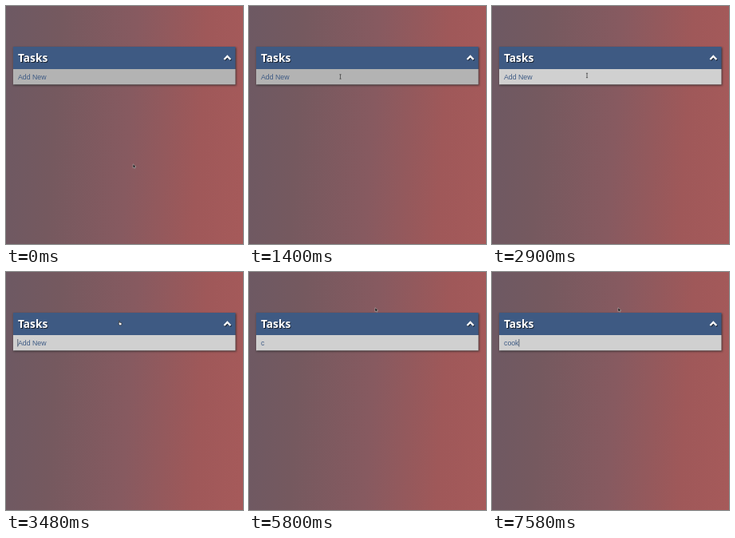
An HTML page that plays this animation: 297x298 px, repeating every 8 s.

```html
<!DOCTYPE html>
<html lang="en">
<head>
<meta charset="utf-8">
<title>Tasks</title>
<style>
  html, body { margin: 0; width: 100%; height: 100%; overflow: hidden; }
  body { background: linear-gradient(94deg, #6d5963 0%, #75595f 22%, #875a60 52%, #9f5859 80%, #a65a5a 100%); }
  svg { display: block; position: absolute; left: 0; top: 0; }
  .title { font: 700 13.7px "Open Sans", "Noto Sans", sans-serif; }
  .entry { font: 8.75px "Liberation Sans", Arial, sans-serif; fill: #3d5a84; }
  .chevron { fill: none; stroke-width: 2.3; }
</style>
</head>
<body>
<svg width="297" height="298" viewBox="0 0 297 298">
  <defs>
    <filter id="soft" x="-5%" y="-20%" width="110%" height="140%">
      <feGaussianBlur stdDeviation="0.8"/>
    </filter>
  </defs>

  <rect x="9.5" y="52" width="279" height="47.5" fill="#222" opacity=".75" filter="url(#soft)"/>
  <rect x="9" y="51" width="278.5" height="28" fill="#3e5a83"/>
  <rect id="row" x="9" y="79" width="278.5" height="19.3"/>

  <text class="title" x="15.9" y="71" fill="#17202e">Tasks</text>
  <text class="title" x="15" y="70" fill="#fff">Tasks</text>
  <path class="chevron" d="M274.2 68 L278.2 64 L282.2 68" stroke="#17202e"/>
  <path class="chevron" d="M273.4 67 L277.4 63 L281.4 67" stroke="#fff"/>

  <text id="entry" class="entry" x="15" y="91.6"></text>
  <rect id="caret" y="84" width=".8" height="9.6" fill="#3a4a60"/>

  <g id="pointer">
    <path id="arrow" d="M-1.8 -2.6 L2 .9 L.3 1.1 L1 2.6 L.1 2.9 L-.6 1.4 L-1.8 2.3 Z"
          fill="#111" stroke="#ccc" stroke-width=".5"/>
    <path id="beam" d="M-1.1 -2.7 H1.1 M0 -2.7 V2.7 M-1.1 2.7 H1.1"
          fill="none" stroke="#444" stroke-width=".8"/>
    <path id="hand" d="M-1.6 -2.8 L-.6 -2.8 L-.4 -.8 L2 -.2 L1.9 1.5 L1.2 2.8 L-.8 2.8 L-2.2 .6 L-1.4 .2 Z"
          fill="#f4f4f4" stroke="#1a1a1a" stroke-width=".6"/>
  </g>
</svg>

<script>
const LOOP = 8000;
const FOCUS = 2050;
const BLINK = 600;
const $ = id => document.getElementById(id);
const row = $('row'), entry = $('entry'), caret = $('caret'), pointer = $('pointer');
const shapes = { arrow: $('arrow'), beam: $('beam'), hand: $('hand') };

// Pointer stops: time, x, y
const path = [
  [0, 161, 200.5], [600, 161, 200.5], [850, 155, 172], [1180, 122, 104], [1400, 114.5, 88.5],
  [2380, 114.5, 88.5], [2480, 115, 88.7], [2800, 115, 88.7], [2900, 119, 87],
  [3200, 131, 76], [3480, 143, 64], [3580, 146, 63.5], [3780, 146, 63.5],
  [4100, 160.5, 48], [4250, 160.5, 48], [4280, 159.8, 47.3], [LOOP, 159.8, 47.3]
];

// Typed text and the moment its caret blink restarts
const typing = [
  [FOCUS, ''], [5200, 'c'], [5880, 'co'], [6030, 'coo'], [7580, 'cook']
];

function pointerAt(t) {
  const i = path.findIndex(p => p[0] > t);
  const [t0, x0, y0] = path[i - 1], [t1, x1, y1] = path[i];
  const k = (t - t0) / (t1 - t0);
  return [x0 + (x1 - x0) * k, y0 + (y1 - y0) * k];
}

function pointerShape(y) {
  if (y < 51 || y > 98) return 'arrow';
  return y < 79 ? 'hand' : 'beam';
}

function draw(t) {
  const focused = t >= FOCUS;
  const step = typing.filter(s => s[0] <= t).pop();
  const typed = step ? step[1] : '';
  row.setAttribute('fill', focused ? '#d0d0d0' : '#b3b3b3');
  entry.textContent = typed || 'Add New';

  const lit = focused && Math.floor((t - step[0]) / BLINK) % 2 === 0;
  caret.style.display = lit ? '' : 'none';
  caret.setAttribute('x', typed ? 15 + entry.getComputedTextLength() : 14.4);

  const [x, y] = pointerAt(t);
  pointer.setAttribute('transform', `translate(${x} ${y})`);
  const shape = pointerShape(y);
  for (const name in shapes) shapes[name].style.display = name === shape ? '' : 'none';
}

const start = performance.now();
function tick() {
  draw((performance.now() - start) % LOOP);
  requestAnimationFrame(tick);
}
tick();
</script>
</body>
</html>
```
